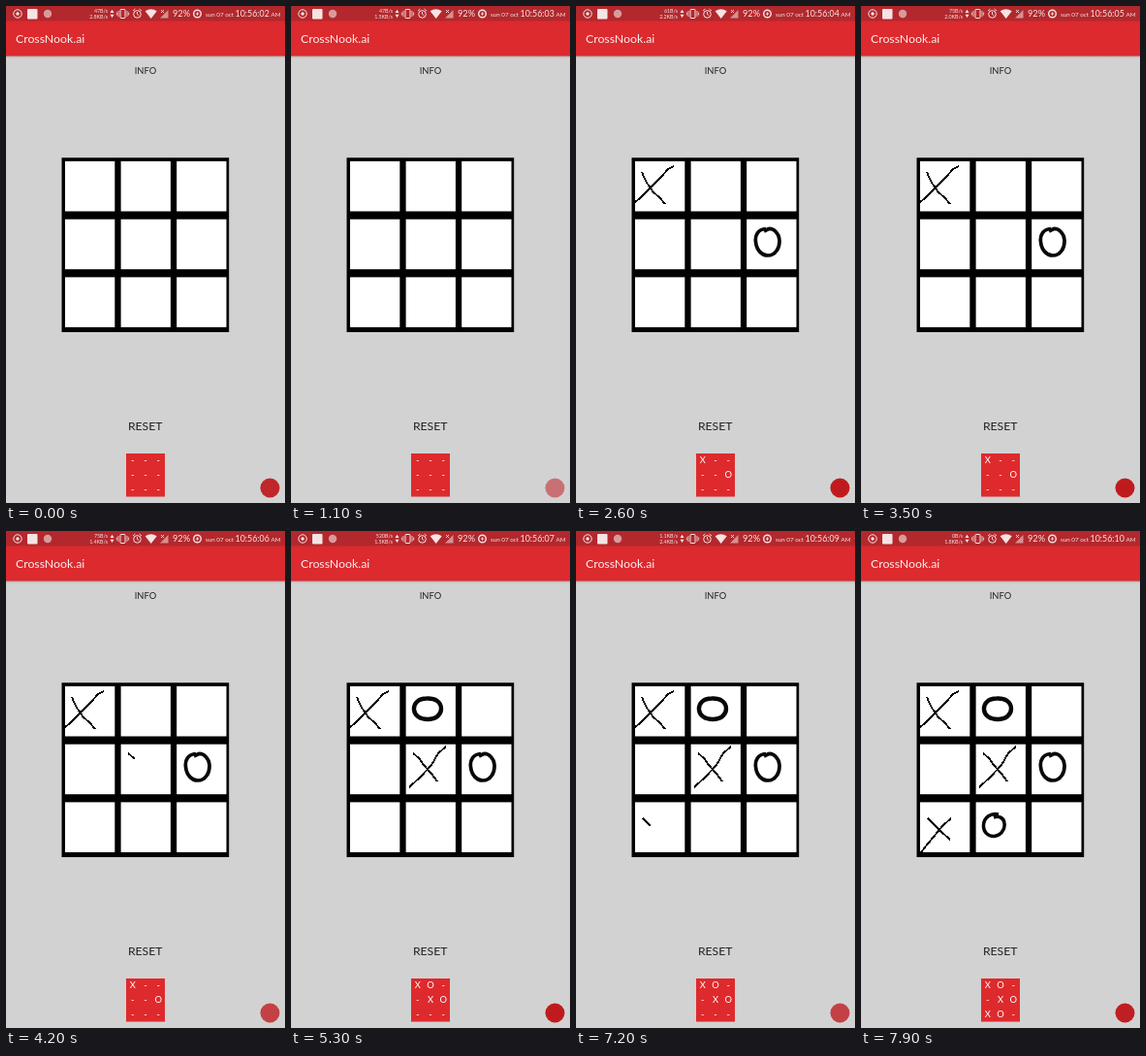
Write an HTML page that moves like this. It is 288x512 px and loops after 8000 ms.

```html
<!DOCTYPE html>
<html lang="en">
<head>
<meta charset="utf-8">
<title>Noughts and crosses</title>
<style>
html, body { margin: 0; width: 100%; height: 100%; overflow: hidden; background: #d2d2d2; }
svg { display: block; width: 100%; height: 100%; font-family: Lato, Roboto, sans-serif; }
.ink { fill: none; stroke: #080808; stroke-linejoin: round; }
.cross { stroke-width: 1.9; shape-rendering: crispEdges; }
.line { fill: none; stroke: #f6e3e4; }
.mid { text-anchor: middle; }
</style>
</head>
<body>
<svg viewBox="0 0 288 512">
  <defs>
    <linearGradient id="shade" x2="0" y2="1">
      <stop stop-color="#8f8080" stop-opacity=".65"/>
      <stop offset="1" stop-color="#d2d2d2" stop-opacity="0"/>
    </linearGradient>
    <filter id="soft"><feGaussianBlur stdDeviation=".45"/></filter>
  </defs>
  <rect width="288" height="512" fill="#d2d2d2"/>
  <rect y="51" width="288" height="4" fill="url(#shade)"/>
  <rect width="288" height="51.5" fill="#dc2a2e"/>
  <rect width="288" height="15.5" fill="#b2282d"/>

  <g fill="#f6e3e4">
    <circle class="line" cx="12" cy="8" r="4.2"/>
    <circle cx="12" cy="8" r="1.7"/>
    <rect x="22" y="3" width="10.5" height="10.5" rx="1"/>
    <circle cx="43" cy="8" r="4.2" fill="#d99a9c"/>
    <g font-size="5.3" text-anchor="end">
      <text id="up" x="105" y="6.8"/>
      <text id="down" x="105" y="12.6"/>
    </g>
    <path d="M107.5 7l2-3.2 2 3.2zM107.5 8.8l2 3.2 2-3.2z"/>
    <rect class="line" x="118" y="3.5" width="5" height="9" rx=".6"/>
    <path class="line" d="M116 5v6M125 5v6M114.4 6.5v3M126.6 6.5v3" stroke-width=".8"/>
    <circle class="line" cx="135.5" cy="8.4" r="3.8"/>
    <path class="line" d="M135.5 6v2.6l1.7 1M131 5l2.4-2M140 5l-2.4-2" stroke-width=".9"/>
    <path d="M143.7 5.3Q149.7 1 155.7 5.3L149.7 13z"/>
    <path d="M159 12.5L167.5 4v8.5z" opacity=".55"/>
    <path class="line" d="M160 4l3 3m0-3l-3 3" stroke-width=".9"/>
    <text x="172" y="11.3" font-size="9.2">92%</text>
    <circle class="line" cx="197.5" cy="8" r="3.8" stroke-width="1.4"/>
    <path d="M198.4 5.4l-2.6 3.2h1.5l-.5 2.2 2.5-3.2h-1.4z"/>
    <text x="206" y="11" font-size="6.3">sun 07 oct</text>
    <text id="clock" x="236.5" y="11.2" font-size="8.9"/>
    <text x="273.5" y="11.2" font-size="6.3">AM</text>
  </g>

  <text x="10" y="37.8" font-size="12.3" fill="#fbeeee">CrossNook.ai</text>
  <g class="mid" fill="#222">
    <text x="144" y="70" font-size="9.4">INFO</text>
    <text x="143.7" y="437.3" font-size="12.2">RESET</text>
  </g>
  <rect x="57.5" y="156.3" width="172.7" height="179.7"/>
  <g id="cells" fill="#fff"></g>
  <g id="marks"></g>
  <rect x="124" y="461" width="40" height="44.5" fill="#de2a2d"/>
  <g id="mini" class="mid" fill="#fff" font-size="9.4"></g>
  <circle id="dot" cx="272.5" cy="496.5" r="10" fill="#bf1b1f"/>
</svg>
<script>
const LOOP = 8000, FIRST_TICK = 750;
const $ = id => document.getElementById(id);

function add(parent, tag, attrs) {
  const node = document.createElementNS("http://www.w3.org/2000/svg", tag);
  for (const key in attrs) node.setAttribute(key, attrs[key]);
  return parent.appendChild(node);
}

// Each move: two pen strokes [path, start, end], then the reply.
const moves = [
  { cell: 0, replyCell: 5, replyAt: 2200,
    strokes: [["M68 171L70 176 73 182 80 192 86 197 92 204", 1400, 1580],
              ["M101 165L95 168 88 176 76 188 66 198 61 202", 1680, 1900]],
    reply: "M196 229.5C188 230 184.5 236 185.5 243C186.5 252 192 257 198 257C206 257 210.5 249 210 241C209.5 234 204 229 199 229.5L194 232", width: 3.7 },
  { cell: 4, replyCell: 1, replyAt: 4950,
    strokes: [["M126 229L132 234 137 241 145 250 151 258", 4165, 4320],
              ["M160 222L152 229 145 241 134 253 122 264", 4430, 4650]],
    reply: "M140 172.5C131 172.5 126.5 178 127 184C127.5 190 133 194 141 194C150 194 155 189 155 183C155 176 149 172 140 172.5", width: 4.4 },
  { cell: 6, replyCell: 7, replyAt: 7800,
    strokes: [["M69 296L74 301 82 309 92 318", 7150, 7300],
              ["M93 296L84 304 75 315 69 322 62 331", 7400, 7600]],
    reply: "M142 292C134 290 127 295 126.5 303C126 310 131 314.5 137 314.5C144 314 149 308 148 301C147.5 296 143 293 137 295", width: 3.5 }
];

const speeds = [["47B/s", "2.8KB/s"], ["47B/s", "1.5KB/s"], ["61B/s", "2.2KB/s"],
  ["75B/s", "2.0KB/s"], ["75B/s", "1.4KB/s"], ["520B/s", "1.5KB/s"],
  ["2.6KB/s", "4.5KB/s"], ["1.1KB/s", "2.4KB/s"], ["0B/s", "1.8KB/s"]];

const labels = [];
for (let i = 0; i < 9; i++) {
  const col = i % 3, row = Math.floor(i / 3);
  add($("cells"), "rect", { x: 61 + col * 57.6, y: 160 + row * 59.7, width: 51.3, height: 51.5 });
  labels.push(add($("mini"), "text", { x: 130.7 + col * 13.3, y: 471.3 + row * 15 }));
}

for (const move of moves) {
  move.lines = move.strokes.map(([d]) =>
    add($("marks"), "path", { d, class: "ink cross", pathLength: 1 }));
  move.ring = add($("marks"), "path", {
    d: move.reply, class: "ink", "stroke-width": move.width, filter: "url(#soft)" });
}

const show = (node, on) => node.setAttribute("visibility", on ? "visible" : "hidden");
const clamp = v => Math.max(0, Math.min(1, v));

// The record dot fades briefly once a second.
const pulse = [[0, .94], [.1, .53], [.2, .79], [.3, 1], [.85, 1], [1, .94]];
function dotOpacity(phase) {
  const i = pulse.findIndex(([x]) => x > phase);
  const [x0, y0] = pulse[i - 1], [x1, y1] = pulse[i];
  return y0 + (y1 - y0) * (phase - x0) / (x1 - x0);
}

function draw(t) {
  const tick = Math.floor((t - FIRST_TICK) / 1000) + 1;
  $("clock").textContent = "10:56:" + String(tick + 2).padStart(2, "0");
  [$("up").textContent, $("down").textContent] = speeds[tick];
  $("dot").setAttribute("opacity", dotOpacity(t % 1000 / 1000));

  const board = Array(9).fill("-");
  for (const move of moves) {
    move.strokes.forEach(([, start, end], i) => {
      const p = clamp((t - start) / (end - start));
      show(move.lines[i], p > 0);
      move.lines[i].setAttribute("stroke-dasharray", p < 1 ? p + " 2" : "none");
    });
    const replied = t >= move.replyAt;
    show(move.ring, replied);
    if (replied) {
      board[move.cell] = "X";
      board[move.replyCell] = "O";
    }
  }
  board.forEach((mark, i) => { labels[i].textContent = mark; });
}

const origin = performance.now();
function frame() {
  draw((performance.now() - origin) % LOOP);
  requestAnimationFrame(frame);
}
frame();
</script>
</body>
</html>
```
